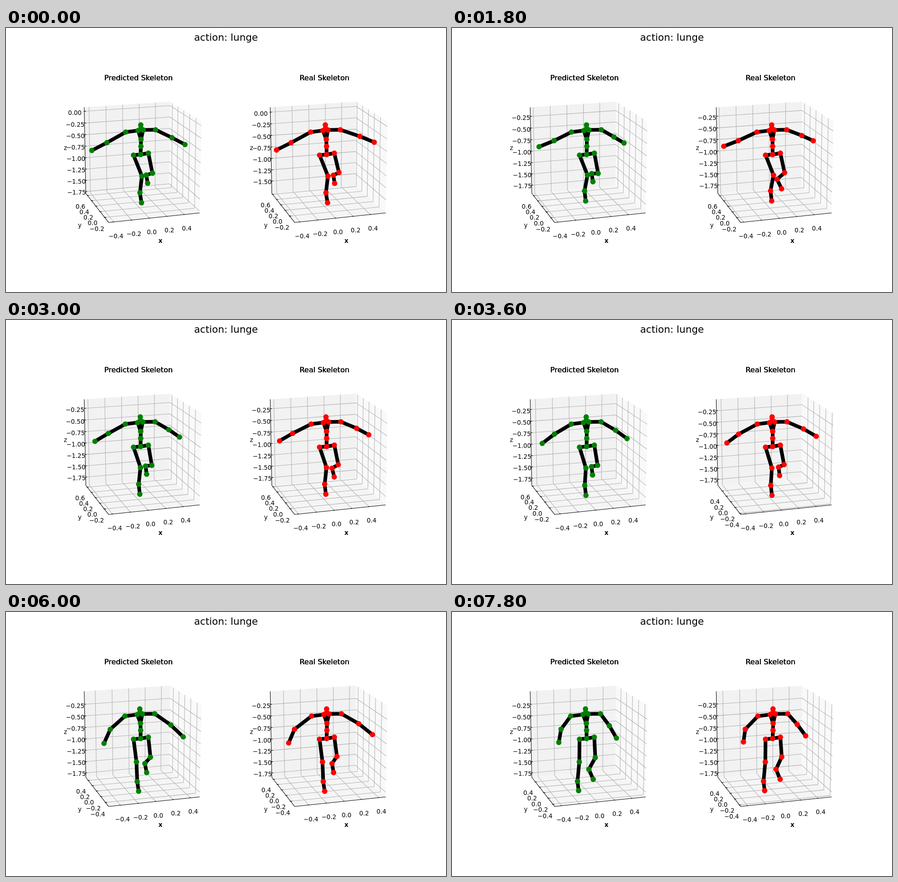
These frames come from a looping animation (966 px wide and 580 px high, 8 s). An HTML page with a canvas:

```html
<!DOCTYPE html>
<html lang="en">
<head>
<meta charset="utf-8">
<title>action: lunge</title>
<style>
  html, body { margin: 0; width: 100%; height: 100%; overflow: hidden; background: #fff; }
  canvas { display: block; }
</style>
</head>
<body>
<canvas id="stage" width="966" height="580"></canvas>
<script>
const ctx = document.getElementById('stage').getContext('2d');
const LOOP = 8000, STEP = 600, PANEL_GAP = 408.4;

// The trunk keeps one pose and only leans; it turns about the pelvis.
const PELVIS_Y = 278, TRUNK_HEIGHT = 65, MID_FRAME = 6.5;
const trunk = {
  head: [294.5, 213], neck: [294.8, 220.5], clavL: [288.7, 225.3], clavR: [300, 224],
  shoulderL: [261.7, 228.7], shoulderR: [327.2, 223.6],
  chest: [295.7, 244.7], spine: [295.8, 260], pelvis: [295.5, PELVIS_Y],
  hipL: [280, 279.3], hipR: [312.5, 275]
};

// Limb joints follow a smooth curve through four key poses.
const LIMB_TIMES = [0, 4, 8, 13];
const limbs = {
  elbowL: [[221.5, 252], [224.5, 248], [226, 254.5], [239.5, 257.5]],
  handL: [[188.5, 269], [193, 263], [205.5, 281], [234.5, 286.5]],
  elbowR: [[364.5, 241], [356, 240], [362.5, 245.5], [345.5, 250]],
  handR: [[393, 256], [378.5, 254.5], [390, 268], [361, 277]],
  kneeL: [[298.5, 325.5], [296.5, 323.5], [290.5, 327.5], [279.5, 329.5]],
  ankleL: [[294, 362], [291, 359], [291, 368.5], [275.5, 372]],
  footL: [[297.5, 384], [293.5, 381], [294, 390], [278, 392.5]],
  kneeR: [[321.5, 319], [320.5, 319.5], [318.5, 319], [314.5, 320]],
  ankleR: [[308, 323], [306.5, 320], [306, 326.5], [300.5, 345.5]],
  footR: [[311, 341], [309, 338], [308.5, 345.5], [310, 367.5]]
};

const BONES = [
  'pelvis spine chest neck head',
  'chest clavL shoulderL elbowL handL',
  'chest clavR shoulderR elbowR handR',
  'pelvis hipL kneeL ankleL footL',
  'pelvis hipR kneeR ankleR footR'
].map(chain => chain.split(' '));

// origin: box positions of x = 0, y = 0 and z = -1 as the axis limits drift.
// shift and kick: how limbs differ from the shared motion, always and briefly.
const ORIGIN_TIMES = [0, 2, 4, 6, 8, 10, 13];
const PANELS = [
  { dx: 0, color: '#008000', title: 'Predicted Skeleton', lean: -.22, shift: {}, kick: {},
    origin: [
      [-.06, -.07, -.09, -.055, -.014, .011, -.04],
      [-.152, -.152, -.173, -.101, .005, .005, -.05],
      [-.079, -.018, .011, -.016, -.047, -.047, -.047]] },
  { dx: PANEL_GAP, color: '#ff0000', title: 'Real Skeleton', lean: .28,
    shift: { elbowL: [-4, 0], handL: [-3, -1], elbowR: [4, -3], handR: [7, -5],
             kneeR: [1, -1.5], ankleR: [2.5, 0], footR: [2, 0] },
    kick: { ankleR: [-4, 13], footR: [4, 16] },
    origin: [
      [-.058, -.077, -.087, -.06, -.027, .036, -.04],
      [-.108, -.152, -.167, -.087, -.028, .045, -.072],
      [-.088, -.018, .014, -.029, -.053, -.048, -.045]] }
];

// Per axis: tick spacing, value at the origin, box units per value unit,
// grid line, tick, label anchor and label nudge in pixels.
const H = .5, OUT = .6, LIMIT = .48, TICK_OUT = -.508, TICK_IN = -.483;
const AXES = [
  { step: .2, base: 0, scale: .965, digits: 1, nudge: [-1, 3.5],
    grid: u => [[u, H, H], [u, H, -H], [u, -H, -H]],
    tick: u => [[u, TICK_OUT, -H], [u, TICK_IN, -H]],
    label: u => [u, -OUT, -OUT] },
  { step: .2, base: 0, scale: .95, digits: 1, nudge: [3, 3.5],
    grid: v => [[H, v, H], [H, v, -H], [-H, v, -H]],
    tick: v => [[TICK_OUT, v, -H], [TICK_IN, v, -H]],
    label: v => [-OUT, v, -OUT] },
  { step: .25, base: -1, scale: .533, digits: 2, nudge: [3, 6],
    grid: w => [[-H, H, w], [H, H, w], [H, -H, w]],
    tick: w => [[TICK_OUT, H, w], [TICK_IN, H, w]],
    label: w => [-OUT, OUT, w] }
];
const PANES = [
  ['#f9f9f9', [[H, H, H], [H, -H, H], [H, -H, -H], [H, H, -H]]],
  ['#f2f2f2', [[-H, H, H], [H, H, H], [H, H, -H], [-H, H, -H]]],
  ['#f5f5f5', [[-H, H, -H], [H, H, -H], [H, -H, -H], [-H, -H, -H]]]
];
const EDGES = [[H, -H, -H], [-H, -H, -H], [-H, H, -H], [-H, H, H]];

const rad = Math.PI / 180;
const sinT = Math.sin(17 * rad), cosT = Math.cos(17 * rad);
const sinE = Math.sin(16 * rad), cosE = Math.cos(16 * rad);

// Perspective view of the unit box centred on the origin.
function project([x, y, z]) {
  const away = sinT * x + cosT * y;
  const size = 202.8 * 9.47 / (9.47 + cosE * away - sinE * z);
  return [296 + size * (cosT * x - sinT * y), 288 - size * (sinE * away + cosE * z)];
}

// Straight interpolation between values at the given times.
function ramp(times, values, t) {
  let k = 0;
  while (k < times.length - 2 && t >= times[k + 1]) k++;
  return values[k] + (values[k + 1] - values[k]) * (t - times[k]) / (times[k + 1] - times[k]);
}

// Polynomial curve through points at the given times.
function curve(times, points, t) {
  const weights = times.map((a, i) =>
    times.reduce((w, b, j) => i === j ? w : w * (t - b) / (a - b), 1));
  return [0, 1].map(axis => points.reduce((sum, p, i) => sum + p[axis] * weights[i], 0));
}

function poseAt({ dx, lean, shift, kick }, frame) {
  const pose = {};
  for (const name in trunk) {
    const [x, y] = trunk[name];
    const sway = lean * (frame - MID_FRAME) * (PELVIS_Y - y) / TRUNK_HEIGHT;
    pose[name] = [x + dx + sway, y];
  }
  const pulse = Math.exp(-(((frame - 3.3) / 1.7) ** 2));
  for (const name in limbs) {
    const [x, y] = curve(LIMB_TIMES, limbs[name], frame);
    const [sx, sy] = shift[name] || [0, 0];
    const [kx, ky] = kick[name] || [0, 0];
    pose[name] = [x + dx + sx + kx * pulse, y + sy + ky * pulse];
  }
  return pose;
}

function trace(points) {
  ctx.beginPath();
  points.forEach(p => ctx.lineTo(p[0], p[1]));
}

function line(points, color, width) {
  trace(points);
  ctx.strokeStyle = color;
  ctx.lineWidth = width;
  ctx.stroke();
}

function text(str, x, baseline, size, weight = 'normal') {
  ctx.font = `${weight} ${size}px "DejaVu Sans", sans-serif`;
  ctx.fillStyle = '#000';
  ctx.fillText(str, x, baseline);
}

function drawBox(origin) {
  for (const [fill, corners] of PANES) {
    trace(corners.map(project));
    ctx.fillStyle = fill;
    ctx.fill();
  }
  const ticks = AXES.flatMap((axis, i) => {
    const found = [];
    for (let n = -8; n <= 8; n++) {
      const value = n * axis.step;
      const at = origin[i] + (value - axis.base) * axis.scale;
      if (Math.abs(at) < LIMIT) found.push({ axis, value, at });
    }
    return found;
  });
  ticks.forEach(({ axis, at }) => line(axis.grid(at).map(project), '#b0b0b0', 1.07));
  line(EDGES.map(project), '#000', 1.07);
  for (const { axis, value, at } of ticks) {
    line(axis.tick(at).map(project), '#000', 1.07);
    const [x, y] = project(axis.label(at));
    const sign = value < 0 ? '\u2212' : '';
    text(sign + Math.abs(value).toFixed(axis.digits),
      x + axis.nudge[0], y + axis.nudge[1] + 4.9, 13.42);
  }
  text('x', 339, 471.5, 13.42, 'bold');
  text('y', 162, 437.5, 13.42);
  text('z', 130.5, 267.5, 13.42);
}

function drawSkeleton(pose, color) {
  BONES.forEach(chain => line(chain.map(name => pose[name]), '#000', 8));
  ctx.fillStyle = color;
  for (const [x, y] of Object.values(pose)) {
    ctx.beginPath();
    ctx.arc(x, y, 5.9, 0, 2 * Math.PI);
    ctx.fill();
  }
}

function draw() {
  const frame = Math.floor(performance.now() % LOOP / STEP);
  ctx.fillStyle = '#fff';
  ctx.fillRect(0, 0, 966, 580);
  ctx.textAlign = 'center';
  ctx.lineJoin = 'round';
  text('action: lunge', 483, 27.8, 21.47);
  for (const panel of PANELS) {
    ctx.save();
    ctx.translate(panel.dx, 0);
    // Overlaid copies give the titles their heavier strokes.
    for (const nudge of [-.3, .3]) text(panel.title, 290.9 + nudge, 115, 16.1);
    drawBox(panel.origin.map(values => ramp(ORIGIN_TIMES, values, frame)));
    ctx.restore();
    drawSkeleton(poseAt(panel, frame), panel.color);
  }
  requestAnimationFrame(draw);
}
draw();
</script>
</body>
</html>
```
